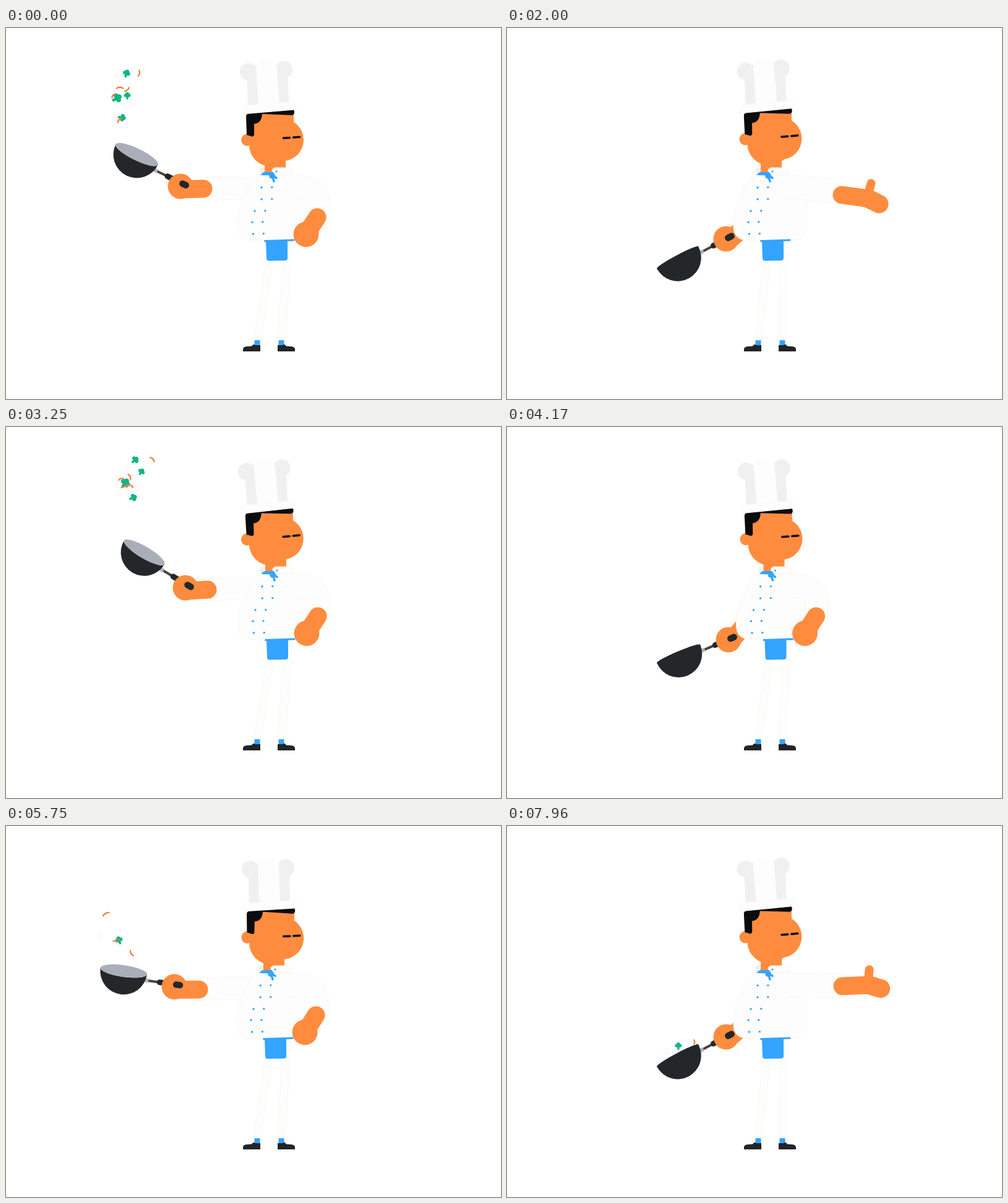
These frames come from a looping animation (800 px wide and 600 px high, 8 s). An HTML page with a canvas:

```html
<!DOCTYPE html>
<html lang="en">
<head>
<meta charset="utf-8">
<title>Chef tossing vegetables</title>
<style>
  html, body { margin: 0; width: 100%; height: 100%; overflow: hidden; background: #fff; }
  canvas { display: block; width: 800px; height: 600px; }
</style>
</head>
<body>
<canvas id="stage" width="800" height="600"></canvas>
<script>
const ctx = document.getElementById('stage').getContext('2d');
const SKIN = '#ff8c3e', WHITE = '#fdfdfd', GREY = '#f0f0f0', EDGE = '#fdf6ea';
const DARK = '#24272a', BLACK = '#0b0b0d', BLUE = '#33a4ff', GREEN = '#10b586', CARROT = '#f5793c';
const LOOP = 8000, CYCLE = 6000, TOSS = 3000;
const rad = deg => deg * Math.PI / 180;

// Pan pose: grip x, y, angle, wrist x, y, body shift, head dx, dy, angle
const PAN = {
  rise:  [288, 253, 26, 319, 260, 0, 0, 0, 0],
  high:  [296, 257, 30.5, 326, 263, 1, 0, 0, -1.5],
  catch: [315, 288, 31, 341, 291, .5, 0, 0, -3],
  dip:   [319, 297, 28, 346, 298, 0, 0, 0, -2.6],
  low:   [364, 341, -23, 380, 325, -3.5, -3.5, 0, -.8],
  rest:  [360, 338, -28, 380, 325, -8, -4.5, -1.8, -.8],
  reach: [310, 300, -5, 342, 306, -5, -2, 0, .8],
  back:  [275, 268, 2, 313, 270, -3, -.5, 0, 1.3],
  flick: [278, 257, 8, 312, 264.5, -2, 0, 0, 1.3]
};
const PAN_TRACK = [
  [0, 'rise'], [250, 'high'], [710, 'catch'], [830, 'dip'], [1170, 'low'], [1800, 'rest'], [2100, 'rest'],
  [2500, 'reach'], [2660, 'back'], [2750, 'flick'],
  [3000, 'rise'], [3250, 'high'], [3710, 'catch'], [3830, 'dip'], [4170, 'low'], [5100, 'low'],
  [5500, 'reach'], [5660, 'back'], [5750, 'flick'], [6000, 'rise']
].map(([t, name]) => [t, PAN[name]]);

// Free arm, relative to the body: elbow x, y, wrist x, y, forearm angle
const ARM = {
  hip:   [515, 254, 503, 306, 123],
  out:   [505, 262, 552, 262, -5],
  up:    [500, 262, 520, 213, -80],
  open:  [503, 252, 546, 243, -16],
  offer: [503, 255, 550, 259, -1],
  drop:  [503, 257, 549, 270, 9]
};
const ARM_TRACK = [
  [0, 'hip'], [80, 'hip'], [330, 'out'], [640, 'up'], [1100, 'up'], [1480, 'open'], [1750, 'open'],
  [1960, 'offer'], [2000, 'drop'], [2400, 'hip'], [6000, 'hip']
].map(([t, name]) => [t, ARM[name]]);

// Smooth interpolation that never overshoots its keys
function sample(track, t) {
  let i = 0;
  while (i < track.length - 2 && t >= track[i + 1][0]) i++;
  const [t0, from] = track[i], [t1, to] = track[i + 1];
  const span = t1 - t0, u = (t - t0) / span;
  return from.map((a, k) => {
    const b = to[k];
    const slope = j => track[j] && track[j + 1]
      ? (track[j + 1][1][k] - track[j][1][k]) / (track[j + 1][0] - track[j][0]) : 0;
    const tangent = (p, q) => p * q > 0 ? 2 * p * q / (p + q) : 0;
    const here = slope(i);
    const m0 = tangent(slope(i - 1), here) * span, m1 = tangent(here, slope(i + 1)) * span;
    const u2 = u * u, u3 = u2 * u;
    return a * (2 * u3 - 3 * u2 + 1) + m0 * (u3 - 2 * u2 + u) + b * (3 * u2 - 2 * u3) + m1 * (u3 - u2);
  });
}

function at(x, y, deg, draw) {
  ctx.save();
  ctx.translate(x, y);
  ctx.rotate(rad(deg));
  draw();
  ctx.restore();
}
function line(x0, y0, x1, y1, width, color, cap = 'round') {
  ctx.beginPath();
  ctx.moveTo(x0, y0);
  ctx.lineTo(x1, y1);
  ctx.lineWidth = width;
  ctx.strokeStyle = color;
  ctx.lineCap = cap;
  ctx.stroke();
}
function oval(x, y, rx, ry, color) {
  ctx.beginPath();
  ctx.ellipse(x, y, rx, ry, 0, 0, 7);
  ctx.fillStyle = color;
  ctx.fill();
}
const dot = (x, y, r, color) => oval(x, y, r, r, color);
function shape(d, color, edge) {
  const path = new Path2D(d);
  ctx.fillStyle = color;
  ctx.fill(path);
  if (!edge) return;
  ctx.lineWidth = 1;
  ctx.strokeStyle = edge;
  ctx.stroke(path);
}
function sleeve(x0, y0, cx, cy, x1, y1, width) {
  for (const [w, color] of [[width + 1.5, EDGE], [width, WHITE]]) {
    ctx.beginPath();
    ctx.moveTo(x0, y0);
    ctx.quadraticCurveTo(cx, cy, x1, y1);
    ctx.lineWidth = w;
    ctx.lineCap = 'butt';
    ctx.strokeStyle = color;
    ctx.stroke();
  }
}

// Vegetables
function broccoli(size) {
  line(0, 0, 0, size, size * .7, GREEN);
  dot(-size * .55, 0, size * .55, GREEN);
  dot(size * .55, 0, size * .55, GREEN);
  dot(0, -size * .45, size * .6, GREEN);
}
function carrot(size) {
  ctx.beginPath();
  ctx.arc(0, size, size * 1.3, -2.2, -.95);
  ctx.lineWidth = 2.2;
  ctx.lineCap = 'round';
  ctx.strokeStyle = CARROT;
  ctx.stroke();
}
function mushroom(size) {
  dot(0, 0, size, '#fbf0e6');
  dot(0, 0, size - .8, '#fefcfa');
}
// Kind, size, turn, spin per second, then x, y at 0, 250 and 710 ms of a toss
const FOOD = [
  [mushroom, 5, 0, 0, 200, 122, 212, 98, 243, 190],
  [mushroom, 4, 0, 0, 180, 78, 195, 65, 208, 180],
  [mushroom, 4, 0, 0, 178, 147, 183, 108, 201, 184],
  [broccoli, 5.5, 20, 120, 195, 73, 209, 53, 245, 159],
  [broccoli, 7, 60, -100, 180, 113, 193, 90, 217, 180],
  [broccoli, 5, 0, 140, 196, 109, 219, 72, 226, 190],
  [broccoli, 5.5, 100, -130, 188, 145, 206, 114, 229, 206],
  [carrot, 6, 100, -210, 214, 73, 236, 53, 265, 159],
  [carrot, 6, 140, -300, 195, 99, 199, 81, 230, 187],
  [carrot, 5, -50, 130, 174, 110, 186, 85, 206, 173],
  [carrot, 7, 0, 90, 184, 98, 200, 96, 228, 164],
  [carrot, 6, -45, 160, 184, 150, 191, 98, 227, 187]
];
function parabola(t, a, b, c) {
  const p = .25, q = .71;
  return a * (t - p) * (t - q) / (p * q) + b * t * (t - q) / (p * (p - q)) + c * t * (t - p) / (q * (q - p));
}
function drawFood(phase, rimY) {
  const q = (phase + 1000) % TOSS - 1000;
  if (q > -310 && q < 1120) {
    const t = q / 1000 * (q < 0 ? 1.33 : 1);
    for (const [kind, size, turn, spin, xa, ya, xb, yb, xc, yc] of FOOD) {
      const x = parabola(t, xa, xb, xc), y = parabola(t, ya, yb, yc);
      if (y < rimY - 15) at(x, y, turn + spin * t, () => kind(size));
    }
  }
  const hop = (phase - 1840) / 160;
  if (hop > 0 && hop < 1) {
    const lift = 52 * hop * (1 - hop);
    at(277, 365 - lift, 0, () => broccoli(5));
    at(302, 359 - lift, 90, () => carrot(4));
    at(258, 374 - lift, 0, () => mushroom(5));
  }
}

function drawPan(phase, gx, gy, deg) {
  const a = rad(deg), rimY = gy - 90 * Math.sin(a) - 10 * Math.cos(a);
  at(gx, gy, deg, () => {
    oval(-90, -10, 38, 4, DARK);
    line(-56, 0, -28, 0, 4, '#4b413c', 'butt');
    line(-55, 0, -48, 0, 6, '#a9b1ba', 'butt');
    line(-30, 0, -10, 0, 9, DARK);
  });
  const opening = Math.max(0, Math.min(9.5, 7.5 + deg * .5));
  const inside = () => at(gx, gy, deg, () => oval(-90, -10, 38, opening, '#a9aeb9'));
  const bowl = () => at(gx, gy, deg, () => {
    ctx.beginPath();
    ctx.arc(-90, -10, 38, 0, Math.PI);
    if (opening) ctx.ellipse(-90, -10, 38, opening, 0, Math.PI, 0, true);
    ctx.fillStyle = DARK;
    ctx.fill();
  });
  if (opening) {
    bowl();
    inside();
    drawFood(phase, rimY);
  } else {
    drawFood(phase, rimY + 40);
    bowl();
    at(gx, gy, deg, () => oval(-90, -10, 38, 4, DARK));
  }
}

function drawPanArm(phase, gx, gy, deg, wx, wy, shift) {
  const sx = 408 + shift;
  sleeve(sx, 262, (wx + sx) / 2, wy - 3, wx - 8, wy, 36);
  drawPan(phase, gx, gy, deg);
  line(gx - 4, gy + 8, wx, wy, 29, SKIN);
  dot(gx - 6, gy + 3, 20.5, SKIN);
  at(gx, gy, deg, () => line(-3, 0, 3, 0, 10.5, DARK));
}

function fist() {
  line(0, 0, 33, 0, 29, SKIN);
  dot(33, 0, 20.5, SKIN);
}
function openHand() {
  line(0, 0, 42, -1, 29, SKIN);
  line(43, -1, 62, 5, 30, SKIN);
  line(44, -26, 42, -8, 14, SKIN);
}
function okHand() {
  ctx.rotate(rad(80));
  line(0, 0, 5, -33, 29, SKIN);
  line(9, -34, 17, -66, 20, SKIN);
  line(-8, -32, 2, -25, 22, SKIN);
  ctx.beginPath();
  ctx.ellipse(-5, -46, 13, 12, 0, 0, 7);
  ctx.lineWidth = 11;
  ctx.strokeStyle = SKIN;
  ctx.stroke();
}
function drawFreeArm(phase, shift) {
  const [cx, cy, wx, wy, deg] = sample(ARM_TRACK, phase);
  const hand = phase < 180 || phase > 2230 ? fist : phase < 1200 ? okHand : openHand;
  at(shift, 0, 0, () => {
    sleeve(460, 257, cx, cy, wx, wy, 38);
    at(wx, wy, deg, hand);
  });
}

function drawLegs(shift) {
  for (const [hip, foot, width] of [[431, 406, 11], [456, 445, 12]]) {
    line(hip + shift, 345, foot, 506, width + 1.5, EDGE, 'butt');
    line(hip + shift, 345, foot, 506, width, WHITE, 'butt');
    line(foot, 505, foot, 514, 9, BLUE, 'butt');
  }
  const shoe = 'M0 523V519Q1 515 7 515L14 514.5Q17 510 20 513L28 513V523Z';
  at(383, 0, 0, () => shape(shoe, '#222428'));
  at(467, 0, 0, () => { ctx.scale(-1, 1); shape(shoe, '#222428'); });
}

function drawTorso() {
  shape('M410 226H421V238H410Z', GREY);
  shape('M418 205H452V238H418Z', SKIN);
  shape('M411 238Q396 242 389 266L376 296Q374 302 374 322Q375 343 396 343H470Q492 342 492 318V275Q486 238 456 237Z', WHITE, EDGE);
  shape('M420 345H455V372Q455 376 451 376L425 376.500Q421 376.500 421 372Z', BLUE);
  line(418.500, 344.500, 465, 343, 3, BLUE);
}
function drawCollar() {
  shape('M435 226H458Q463 227 463 232V237H437Q430 236 430 231Q430 227 435 226Z', WHITE, EDGE);
  shape('M412 238Q414 233 419 233L432 233L434 238.500Z', BLUE);
  dot(430, 239, 4.8, BLUE);
  line(431, 241, 433, 248, 3.500, BLUE);
  line(432, 239, 437, 242.500, 3.500, BLUE);
  for (const [x, y] of [[413, 258], [413, 277], [402, 296], [398, 314], [399.500, 333]]) {
    dot(x, y, 1.7, BLUE);
    dot(x + 16.800, y - .4, 1.7, BLUE);
  }
  dot(437, 232, 1.6, BLUE);
}

function drawHead() {
  shape('M394 137H465V185H394Z', SKIN);
  dot(428, 189, 35, SKIN);
  dot(447, 181, 34, SKIN);
  dot(390, 181, 9.8, SKIN);
  shape('M388 143Q388 139 393 138L462 131Q466 132 466 136Q466 141 461 141L414 139Q413 154 401 155V173Q399 177 396 175L389 173Z', BLACK);
  line(448.500, 178, 458.500, 177.500, 3.500, BLACK);
  line(464.500, 177, 474.500, 176.300, 3.500, BLACK);
  dot(392, 71, 14, GREY);
  dot(449, 67, 14, GREY);
  shape('M389 66L408 60L410 123L391 125Z', GREY);
  shape('M437 60L455 64L457 121L440 123Z', GREY);
  shape('M404 66Q406 52 421 52Q436 52 438 64L442 124L408 126Z', WHITE);
  line(386, 132.500, 463, 126, 13.500, EDGE);
  line(386, 132.500, 463, 126, 12.500, WHITE);
}

function frame(now) {
  const phase = now % LOOP % CYCLE;
  const [gx, gy, deg, wx, wy, shift, headX, headY, tilt] = sample(PAN_TRACK, phase);
  ctx.fillStyle = '#fff';
  ctx.fillRect(0, 0, 800, 600);
  drawLegs(shift);
  drawPanArm(phase, gx, gy, deg, wx, wy, shift);
  at(shift, 0, 0, drawTorso);
  drawFreeArm(phase, shift);
  at(shift, 0, 0, drawCollar);
  at(428 + headX, 190 + headY, tilt, () => {
    ctx.translate(-428, -190);
    drawHead();
  });
}

let start;
function tick(now) {
  start ??= now;
  frame(now - start);
  requestAnimationFrame(tick);
}
frame(0);
requestAnimationFrame(tick);
</script>
</body>
</html>
```
